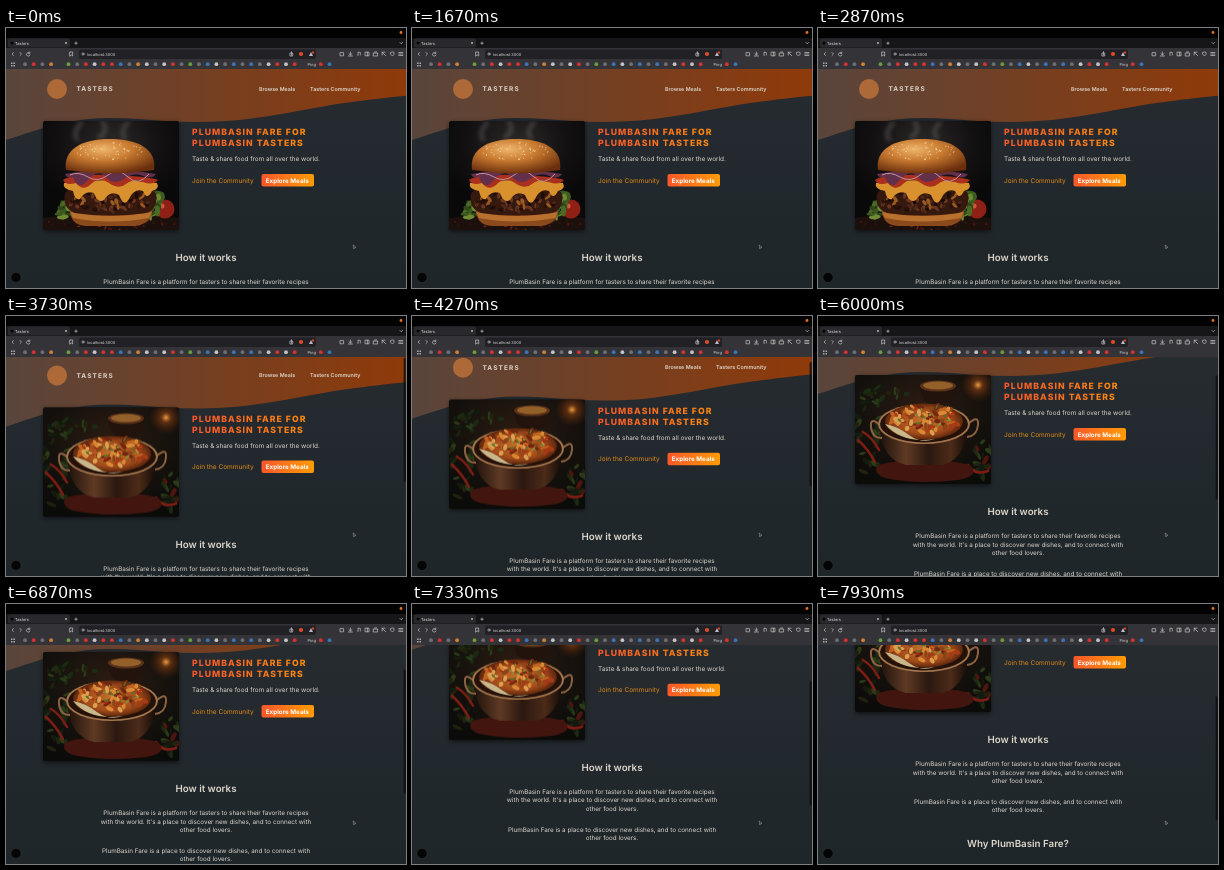
An HTML page for the animation above (8 s loop, 400x260 px).

```html
<!DOCTYPE html>
<html lang="en">
<head>
<meta charset="utf-8">
<title>Tasters</title>
<style>
  html, body { margin: 0; width: 100%; height: 100%; overflow: hidden; background: #000; }
  svg { display: block; width: 100%; height: 100%; }
  text { font-family: Inter, sans-serif; fill: #ddd6cb; text-rendering: geometricPrecision; white-space: pre; }
  .nav { font-size: 5.35px; font-weight: 600; }
  .brand { font-size: 6.5px; font-weight: 700; letter-spacing: 1.1px; }
  .hero { font-size: 8.7px; font-weight: 800; letter-spacing: 1.05px; fill: url(#flameText); }
  .lead { font-size: 6.4px; }
  .join { font-size: 6.5px; fill: #e08a18; }
  .cta { font-size: 6.25px; font-weight: 700; fill: #fff; }
  .title { font-size: 9.75px; font-weight: 600; text-anchor: middle; }
  .body { font-size: 6.3px; text-anchor: middle; }
  .chrome { font-size: 4px; fill: #d8d8d8; }
  .slide { transform-box: fill-box; transform-origin: center; }
  .line { fill: none; stroke: #c4c4c4; stroke-width: .7; stroke-linecap: round; stroke-linejoin: round; }
</style>
</head>
<body>
<svg viewBox="0 0 400 260" preserveAspectRatio="none">
  <defs>
    <linearGradient id="page" x2="0" y2="1">
      <stop stop-color="#262b30"/><stop offset="1" stop-color="#1e262a"/>
    </linearGradient>
    <linearGradient id="wave">
      <stop stop-color="#59453c"/><stop offset="1" stop-color="#8f3a09"/>
    </linearGradient>
    <linearGradient id="flameText" gradientUnits="userSpaceOnUse" x1="186" x2="340" y1="0" y2="0">
      <stop stop-color="#f9572a"/><stop offset="1" stop-color="#ff9b05"/>
    </linearGradient>
    <linearGradient id="flame">
      <stop stop-color="#f9572a"/><stop offset="1" stop-color="#ff9b05"/>
    </linearGradient>
    <radialGradient id="smoke" cx=".5" cy=".2" r=".6">
      <stop stop-color="#2b2827"/><stop offset=".6" stop-color="#131112"/><stop offset="1" stop-color="#0a090a"/>
    </radialGradient>
    <radialGradient id="bun" cx=".42" cy=".3" r=".72">
      <stop stop-color="#efb56c"/><stop offset=".45" stop-color="#c87a30"/><stop offset="1" stop-color="#6b2f0d"/>
    </radialGradient>
    <radialGradient id="table" cx=".5" cy=".3" r=".75">
      <stop stop-color="#2c1c12"/><stop offset=".6" stop-color="#15110d"/><stop offset="1" stop-color="#0b0b0a"/>
    </radialGradient>
    <radialGradient id="glow">
      <stop stop-color="#f0a040"/><stop offset=".3" stop-color="#8a4214" stop-opacity=".6"/><stop offset="1" stop-color="#5a260a" stop-opacity="0"/>
    </radialGradient>
    <linearGradient id="copper">
      <stop stop-color="#1d110b"/><stop offset=".3" stop-color="#5f3a24"/><stop offset=".55" stop-color="#2b1810"/>
      <stop offset=".8" stop-color="#4c2b19"/><stop offset="1" stop-color="#120a07"/>
    </linearGradient>
    <radialGradient id="curry">
      <stop stop-color="#c9702a"/><stop offset=".7" stop-color="#a04a1a"/><stop offset="1" stop-color="#5c260d"/>
    </radialGradient>
    <clipPath id="view"><path d="M0 41H400V260H0Z"/></clipPath>
    <clipPath id="frame"><rect x="37" y="93" width="136" height="109" rx="2.5"/></clipPath>
    <filter id="shadow" x="-20%" y="-20%" width="140%" height="140%"><feGaussianBlur stdDeviation="2"/></filter>
  </defs>

  <path d="M0 41H400V260H0Z" fill="url(#page)"/>

  <g clip-path="url(#view)">
    <g id="scroller">
      <path transform="translate(0 41) scale(.2778)" fill="url(#wave)"
        d="M0 256L48 240C96 224 192 192 288 181S480 181 576 187S768 192 864 181S1056 149 1152 133S1344 107 1392 101L1440 96V0H0Z"/>
      <circle cx="51" cy="61" r="10" fill="#ad6a38"/>
      <text class="brand" x="70.5" y="63">TASTERS</text>
      <text class="nav" x="253" y="62.7">Browse Meals</text>
      <text class="nav" x="304" y="62.7">Tasters Community</text>

      <rect x="37" y="94" width="136" height="110" rx="3" fill="#000" opacity=".5" filter="url(#shadow)"/>
      <g clip-path="url(#frame)">
        <path d="M37 93H173V202H37Z" fill="#100e0d"/>
        <g id="burger" class="slide">
          <path d="M37 93H173V202H37Z" fill="url(#smoke)"/>
          <g filter="url(#shadow)" fill="none" stroke="#8a8785" stroke-width="4" opacity=".35">
            <path d="M72 113Q65 105 76 94M92 110Q104 103 96 93M120 111Q112 103 123 94"/>
          </g>
          <path d="M37 190Q105 181 173 190V202H37Z" fill="#1c100d"/>
          <g id="embers"></g>
          <circle cx="159" cy="181" r="9.5" fill="#8f2015"/><circle cx="156" cy="178" r="2.5" fill="#d0573c"/>
          <g id="lettuce"></g>
          <path d="M64 179H146Q147 196 129 198H80Q63 197 64 179Z" fill="#8a4a1b"/>
          <path d="M64 184Q104 192 146 184L143 190Q104 197 67 190Z" fill="#b8702e"/>
          <path d="M59 166Q62 156 104 155T150 166Q152 182 140 185Q104 190 69 185Q56 180 59 166Z" fill="#35180e"/>
          <g id="patty"></g>
          <path d="M58 155Q104 149 151 155Q154 161 146 163Q141 173 137 163Q128 160 123 171Q118 180 113 167Q104 162 98 172Q92 176 88 165Q79 162 74 171Q69 173 67 163Q56 161 58 155Z" fill="#d8912c"/>
          <path d="M57 152Q64 146 103 147T152 152Q147 158 137 154T120 156T103 155T85 156T70 155Q60 158 57 152Z" fill="#a92f1e"/>
          <path d="M59 146Q104 138 150 146Q146 152 137 148T118 151T100 149T82 152T67 149Q61 151 59 146Z" fill="#62304a"/>
          <path d="M64 147Q72 143 82 149T102 147T122 149T143 146" fill="none" stroke="#c48f9e" stroke-width="1"/>
          <path d="M60 142C57 121 76 111 104 111S151 121 148 142Q104 149 60 142Z" fill="url(#bun)"/>
          <g id="seeds"></g>
        </g>
        <g id="curryDish" class="slide">
          <path d="M37 93H173V202H37Z" fill="url(#table)"/>
          <circle cx="160" cy="103" r="17" fill="url(#glow)"/>
          <path d="M102 104H138Q136 121 128 122H112Q104 121 102 104Z" fill="#22130d"/>
          <ellipse cx="120" cy="104" rx="18" ry="5.5" fill="#593219"/>
          <ellipse cx="120" cy="103.5" rx="15" ry="4" fill="#94602a"/>
          <g id="leaves"></g>
          <path d="M40 158Q50 167 57 180M45 150Q54 155 61 168M150 183Q157 194 170 189" fill="none" stroke="#7d1d14" stroke-width="2.5" stroke-linecap="round"/>
          <path d="M60 183Q105 172 152 183Q163 194 140 198Q100 203 67 196Q54 191 60 183Z" fill="#42160f"/>
          <path d="M61 143Q64 178 88 183H124Q147 178 151 143Z" fill="url(#copper)"/>
          <path d="M62 143Q52 134 53 145T64 156M150 142Q161 132 160 143T149 155" fill="none" stroke="#8d6242" stroke-width="2"/>
          <ellipse cx="106" cy="142" rx="46" ry="20" fill="#a2754d"/>
          <ellipse cx="106" cy="142" rx="44" ry="18.5" fill="#24110a"/>
          <ellipse cx="106" cy="139.5" rx="39" ry="18" fill="url(#curry)"/>
          <path d="M67 142Q79 144 91 153T117 157Q84 162 67 142Z" fill="#c9b78c"/>
          <g id="chunks"></g>
        </g>
      </g>

      <text class="hero" x="186" y="107.3">PLUMBASIN FARE FOR</text>
      <text class="hero" x="186" y="118">PLUMBASIN TASTERS</text>
      <text class="lead" x="186" y="133.3">Taste &amp; share food from all over the world.</text>
      <text class="join" x="186" y="154.7">Join the Community</text>
      <rect x="255.5" y="146" width="52.5" height="12.5" rx="2" fill="url(#flame)"/>
      <text class="cta" x="259.8" y="154.6">Explore Meals</text>

      <text class="title" x="200" y="233.2">How it works</text>
      <text class="body" x="200" y="256.4">PlumBasin Fare is a platform for tasters to share their favorite recipes</text>
      <text class="body" x="200" y="264.8">with the world. It's a place to discover new dishes, and to connect with</text>
      <text class="body" x="200" y="273.2">other food lovers.</text>
      <text class="body" x="200" y="294">PlumBasin Fare is a place to discover new dishes, and to connect with</text>
      <text class="body" x="200" y="302.4">other food lovers.</text>
      <text class="title" x="200" y="337.3">Why PlumBasin Fare?</text>
    </g>
  </g>

  <rect id="thumb" x="397.6" y="41" width="2.2" height="124" rx="1.1" fill="#0b0d0e" opacity="0"/>
  <circle cx="10" cy="249.5" r="5" fill="#050505" stroke="#3a3f42" stroke-width=".4"/>
  <path d="M347 217L350 219.3L348.6 219.6L347.9 221Z" fill="#222" stroke="#b5b5b5" stroke-width=".45"/>

  <path d="M0 0H400V10H0Z" fill="#020202"/>
  <circle cx="395" cy="4.5" r="1.4" fill="#e8711c"/>
  <path d="M0 10H400V20H0Z" fill="#161619"/>
  <path d="M0 20H400V41H0Z" fill="#343438"/>
  <rect x="2" y="10.5" width="62" height="9" rx="2" fill="#29292d"/>
  <circle cx="6" cy="15" r="1.5" fill="#050505"/>
  <text class="chrome" x="9" y="16.5">Tasters</text>
  <path class="line" d="M59.3 14.3L60.7 15.7M60.7 14.3L59.3 15.7M70 14V16.4M68.8 15.2H71.2M394 14.5L395.3 15.8L396.6 14.5"/>
  <rect x="73" y="21.5" width="237" height="9.5" rx="2" fill="#212125"/>
  <path class="line" d="M7.5 24.5L6 26L7.5 27.5M14 24.5L15.5 26L14 27.5M23.5 25A1.8 1.8 0 1 0 24 27M23.8 24V25.3H22.5M64 24H66.6V28L65.3 27L64 28Z"/>
  <circle cx="77" cy="26" r="1.1" class="line"/>
  <text class="chrome" x="81" y="27.5">localhost:3000</text>
  <path class="line" d="M284.3 25H286.7V28H284.3ZM285.5 27V23.6"/>
  <circle cx="295" cy="26" r="2.1" fill="#e14b27"/>
  <path d="M303 28L305 24L307 28Z" fill="#b9b9c5"/>
  <circle cx="307" cy="24.5" r="1.2" fill="#d8402f"/>
  <g id="tools"></g>
  <path d="M5 34.5H6.5V36H5ZM7.5 34.5H9V36H7.5ZM5 37H6.5V38.5H5ZM7.5 37H9V38.5H7.5Z" fill="#aaa"/>
  <g id="bookmarks"></g>
  <text class="chrome" x="301.5" y="37.8">Ping</text>
</svg>
<script>
  const LOOP = 8000;
  const $ = id => document.getElementById(id);

  function add(parent, tag, attrs) {
    const node = document.createElementNS("http://www.w3.org/2000/svg", tag);
    for (const key in attrs) node.setAttribute(key, attrs[key]);
    $(parent).append(node);
  }

  function seeded(seed) {
    return () => (seed = seed * 16807 % 2147483647) / 2147483647;
  }

  // Scatters small ellipses inside an elliptical area.
  function scatter(parent, count, [cx, cy, rx, ry], [w, h], colors, seed) {
    const random = seeded(seed);
    for (let i = 0; i < count; i++) {
      const angle = random() * Math.PI * 2, reach = Math.sqrt(random());
      const x = cx + Math.cos(angle) * reach * rx;
      const y = cy + Math.sin(angle) * reach * ry;
      add(parent, "ellipse", {
        cx: x, cy: y, rx: w * (.6 + random() * .6), ry: h * (.6 + random() * .6),
        fill: colors[i % colors.length], transform: `rotate(${random() * 180} ${x} ${y})`
      });
    }
  }

  const darkGreens = ["#1d2a13", "#2b3b19", "#131a0e", "#21210f"];
  const freshGreens = ["#4b6a25", "#6f8a33", "#2f461a", "#3d5a20"];
  scatter("seeds", 60, [103, 123, 34, 9], [.9, .5], ["#f4d49b", "#e8bd7b"], 71);
  scatter("embers", 45, [105, 196, 66, 6], [2, 1], ["#4a1610", "#75221a", "#2a1510", "#17100e"], 45);
  scatter("lettuce", 24, [147, 176, 12, 13], [5, 2.5], freshGreens, 33);
  scatter("lettuce", 18, [62, 182, 12, 8], [5, 2.2], freshGreens, 87);
  scatter("patty", 70, [104, 173, 42, 10], [3, 1.6], ["#50281a", "#2a120b", "#6b3720", "#1d0d08", "#9a5a22"], 61);
  scatter("leaves", 34, [50, 150, 14, 46], [5, 2], darkGreens, 93);
  scatter("leaves", 18, [163, 168, 10, 28], [5, 2], [...darkGreens, "#4d1710"], 29);
  scatter("leaves", 14, [65, 112, 24, 8], [4, 2], darkGreens, 15);
  scatter("chunks", 80, [107, 137, 34, 14], [4, 2], ["#d98a35", "#a53c17", "#c06422", "#6d2610", "#dba052", "#8a4418"], 57);
  scatter("chunks", 20, [106, 134, 30, 11], [2.2, 1], ["#56702a", "#7f8f3c", "#ae2617"], 19);

  const tones = {
    r: "#d4342d", g: "#6b9f3c", b: "#3c74b8", w: "#c4c4c4", o: "#d07f35", d: "#6c7076"
  };
  [..."drdo_gdrwrrbdowdwrdgdbwdbdbdwrwr__rb"].forEach((key, i) => {
    if (tones[key]) add("bookmarks", "circle", { cx: 19 + i * 8.7, cy: 36.2, r: 1.9, fill: tones[key] });
  });

  const glyphs = [
    "M-1.6-1.4H1.6V1.8H-1.6Z", "M0-2V1M-1.5-.4L0 1L1.5-.4M-2 2H2", "M-.8 1.5V-2L1.5-1.5V1", "M-1.8-1.8H1.8V1.8H-1.8ZM.4-1.8V1.8",
    "M-2-1H2V2H-2ZM-1-2H1", "M-1.8-1.8L1.8 1.8M-1.8 1V-1.8H1", "M-1.6-1.6L0-2L1.6-1.6V.4L0 2L-1.6.4Z", "M-2-1.5H2M-2 0H2M-2 1.5H2"
  ];
  glyphs.forEach((d, i) => add("tools", "path", {
    d, class: "line", transform: `translate(${336 + i * 8.4} 26)`
  }));

  const play = (id, frames) => $(id).animate(
    frames.map(([time, style]) => ({ offset: time / LOOP, ...style })),
    { duration: LOOP, iterations: Infinity }
  );

  const scrollSteps = [[0, 0], [3400, 0], [3700, 1], [4930, 19], [6000, 34], [6870, 45], [7930, 94], [LOOP, 96]];
  const shift = factor => scrollSteps.map(([t, y]) => [t, { transform: `translateY(${y * factor}px)` }]);
  play("scroller", shift(-1));
  play("thumb", shift(.545));
  play("thumb", [[0, { opacity: 0 }], [3400, { opacity: 0 }], [3550, { opacity: .8 }], [LOOP, { opacity: .8 }]]);

  const shown = { opacity: 1, transform: "translateX(0px) rotate(0deg) scale(1)", easing: "ease-in-out" };
  const hidden = { opacity: 0, transform: "translateX(-4.4px) rotate(-5deg) scale(1.1)", easing: "ease-in-out" };
  const swap = (id, from, to) => play(id, [[0, from], [3000, from], [3450, to], [LOOP, to]]);
  swap("burger", shown, hidden);
  swap("curryDish", hidden, shown);
</script>
</body>
</html>
```
